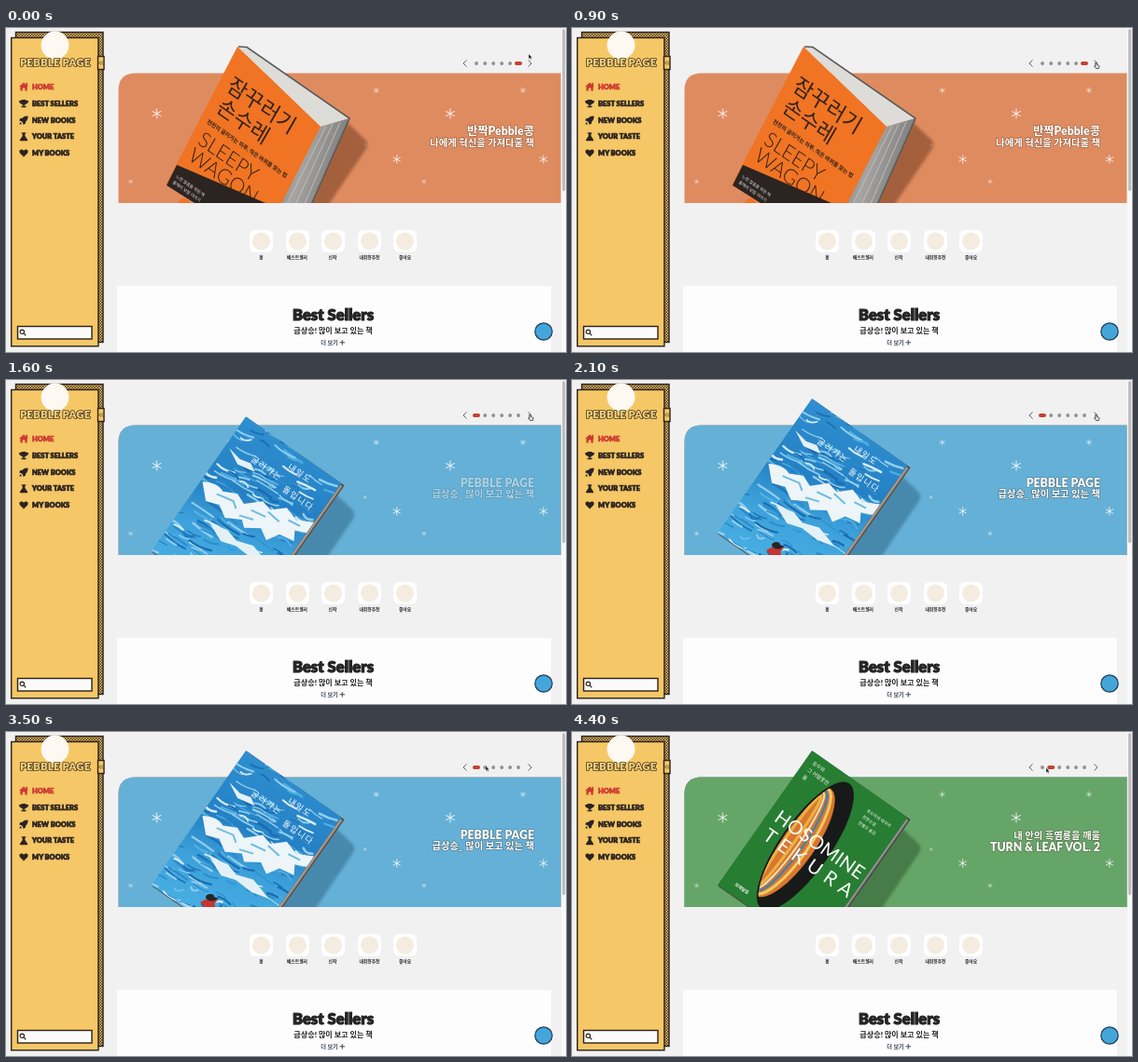
Write an HTML page that moves like this. It is 600 px wide and 348 px high and loops after 4.5 s.

```html
<!DOCTYPE html>
<html lang="ko">
<head>
<meta charset="utf-8">
<title>Book shop</title>
<style>
html, body { margin: 0; width: 100%; height: 100%; overflow: hidden; background: #f1f1f2; }
svg { display: block; width: 100vw; height: 100vh; }
text { font-family: Lato, "Noto Sans CJK KR", "Noto Sans CJK", sans-serif; }
.mid { text-anchor: middle; }
.heavy { font-weight: 900; paint-order: stroke; }
.menu { font-size: 7.4px; letter-spacing: .05px; fill: #2b2320; stroke: #2b2320; stroke-width: .7px; }
.red { fill: #cf3a30; stroke: #cf3a30; }
.caption text { font-size: 10.3px; font-weight: 700; fill: #fff; text-anchor: end;
  paint-order: stroke; stroke: rgba(60, 40, 25, .45); stroke-width: 1.2px; stroke-linejoin: round; }
.caption .big { font-size: 12.3px; font-weight: 900; }
.anim > * { animation: 4.5s linear infinite both; }

/* Banner colours and captions */
.anim > .blue { animation-name: blueIn; }
.anim > .green { animation-name: greenIn; }
.anim > .c1 { animation-name: cap1; }
.anim > .c2 { animation-name: cap2; }
.anim > .c3 { animation-name: cap3; }
@keyframes blueIn { 0%, 22.2% { opacity: 0 } 26%, 100% { opacity: 1 } }
@keyframes greenIn { 0%, 79.4% { opacity: 0 } 83.5%, 100% { opacity: 1 } }
@keyframes cap1 { 0%, 22.2% { opacity: 1 } 25.5%, 100% { opacity: 0 } }
@keyframes cap2 { 0%, 32% { opacity: 0 } 40%, 79.4% { opacity: 1 } 83%, 100% { opacity: 0 } }
@keyframes cap3 { 0%, 88% { opacity: 0 } 96%, 100% { opacity: 1 } }

/* Each book drops out before the next one rises */
.anim > .b1 { animation-name: book1; }
.anim > .b2 { animation-name: book2; }
.anim > .b3 { animation-name: book3; }
@keyframes book1 {
  0%, 22.2% { transform: none; animation-timing-function: ease }
  28.9%, 100% { transform: translateY(170px) }
}
@keyframes book2 {
  0%, 28.9% { transform: translateY(170px); animation-timing-function: ease }
  40% { transform: none }
  79.4% { transform: none; animation-timing-function: ease }
  86.1%, 100% { transform: translateY(170px) }
}
@keyframes book3 {
  0%, 86.1% { transform: translateY(170px); animation-timing-function: ease }
  96%, 100% { transform: none }
}

/* Pager */
.dot { fill: #8f8f90; x: -1.9px; width: 3.8px; }
.anim > .d1 { animation-name: dot1; }
.anim > .d2 { animation-name: dot2; }
.anim > .d6 { animation-name: dot6; }
@keyframes dot1 {
  0%, 22.2% { fill: #8f8f90; x: -1.9px; width: 3.8px }
  28%, 79.4% { fill: #c5412f; x: -4px; width: 8px }
  86%, 100% { fill: #8f8f90; x: -1.9px; width: 3.8px }
}
@keyframes dot2 {
  0%, 79.4% { fill: #8f8f90; x: -1.9px; width: 3.8px }
  86%, 100% { fill: #c5412f; x: -4px; width: 8px }
}
@keyframes dot6 {
  0%, 22.2% { fill: #c5412f; x: -4px; width: 8px }
  31%, 100% { fill: #8f8f90; x: -1.9px; width: 3.8px }
}

/* Pointer */
.cursor { animation: move 4.5s ease-in-out infinite; }
.anim > .hand { animation-name: hand; animation-timing-function: step-end; }
.anim > .arrow { animation-name: arrow; animation-timing-function: step-end; }
@keyframes move {
  0%, 4% { transform: translate(560px, 28px) }
  17.8%, 55.6% { transform: translate(561px, 37px) }
  65%, 87% { transform: translate(514px, 36.5px) }
  95.6%, 100% { transform: translate(508px, 38.5px) }
}
@keyframes hand { 0% { opacity: 0 } 15.5% { opacity: 1 } 57.8%, 100% { opacity: 0 } }
@keyframes arrow { 0% { opacity: 1 } 15.5% { opacity: 0 } 57.8%, 100% { opacity: 1 } }
</style>
</head>
<body>
<svg viewBox="0 0 600 348" preserveAspectRatio="none">
  <defs>
    <pattern id="check" width="3" height="3" patternUnits="userSpaceOnUse">
      <rect width="3" height="3" fill="#f0c368"/>
      <path d="M0 0h1.5v1.5H0zM1.5 1.5H3V3H1.5z" fill="#4a3720"/>
    </pattern>
    <path id="star" d="M0-5V5M-4.4-2.5L4.4 2.5M-4.4 2.5L4.4-2.5" stroke="#fff" stroke-width=".9" stroke-linecap="round"/>
    <pattern id="stars" x="120.5" y="48" width="157.2" height="140" patternUnits="userSpaceOnUse">
      <use href="#star" x="41" y="44"/>
      <use href="#star" transform="translate(119 19) scale(.58)"/>
      <use href="#star" transform="translate(141 93) scale(.85)"/>
      <use href="#star" transform="translate(107 78) scale(.34)"/>
      <use href="#star" transform="translate(13 117) scale(.45)"/>
    </pattern>
    <path id="panel" d="M120.500 188V67Q120.500 48.500 139 48.500H594.500V188Z"/>
    <clipPath id="window"><rect x="100" width="500" height="188"/></clipPath>
    <clipPath id="seaCover"><rect width="125" height="176"/></clipPath>
    <clipPath id="oval"><ellipse cx="53" cy="88" rx="25" ry="80"/></clipPath>
    <filter id="blur" x="-30%" y="-30%" width="160%" height="160%"><feGaussianBlur stdDeviation="1.6"/></filter>
    <linearGradient id="sea" x2=".2" y2="1">
      <stop stop-color="#2f8fd0"/><stop offset=".45" stop-color="#2480c4"/><stop offset=".7" stop-color="#3ca0da"/><stop offset="1" stop-color="#47aee2"/>
    </linearGradient>
    <linearGradient id="pages" x2="1" y2=".35">
      <stop stop-color="#6d6d6d"/><stop offset=".5" stop-color="#a5a4a2"/><stop offset="1" stop-color="#777"/>
    </linearGradient>
    <path id="shade" d="M350 100L370 119Q376 124 371 131L322 204H270Z" filter="url(#blur)"/>
  </defs>

  <rect width="600" height="348" fill="#f1f1f2"/>

  <!-- Sidebar -->
  <g stroke="#2b2118" stroke-width="1.4">
    <rect x="10.5" y="4.5" width="93.5" height="333" fill="url(#check)"/>
    <rect x="5.700" y="10.500" width="93.200" height="331.300" fill="#f5c766"/>
    <rect x="98.500" y="30.500" width="6.500" height="14" fill="#f5c766"/>
    <rect x="12.500" y="320.500" width="79.500" height="13.500" fill="#fafafa"/>
    <g fill="none" stroke-width="1.1"><circle cx="17.3" cy="326.3" r="2.2"/><path d="M19 328l2.3 2.4"/></g>
    <path d="M101.5 35.5l-1.6 2 1.6 2M104 35.5l-1.6 2 1.6 2" fill="none" stroke-width=".7"/>
  </g>
  <circle cx="52.5" cy="18.500" r="15" fill="#fdf8f2"/>
  <text class="mid heavy" x="52.700" y="41.300" font-size="11.400" letter-spacing=".2" fill="#f8d67e" stroke="#4d3a22" stroke-width="1.700" stroke-linejoin="round">PEBBLE PAGE</text>
  <g class="heavy">
    <text class="menu red" x="28" y="65.700">HOME</text>
    <text class="menu" x="28" y="83.600">BEST SELLERS</text>
    <text class="menu" x="28" y="101.500">NEW BOOKS</text>
    <text class="menu" x="28" y="119.400">YOUR TASTE</text>
    <text class="menu" x="28" y="137.200">MY BOOKS</text>
  </g>
  <g fill="#2b2320">
    <path d="M19 58.500L24 63h-1.300v4.500h-2.400v-3h-2.600v3h-2.400V63H14ZM21.500 58.800h1.500v3h-1.500Z" fill="#cf3a30"/>
    <path d="M16.400 77h5.200v1H24q0 3.300-2.900 3.800-.6.8-1.400 1v1h1.800v1.400h-5v-1.400h1.800v-1q-.8-.2-1.400-1Q14 81.300 14 78h2.400Z"/>
    <path d="M23.500 94.500q-4.200-.2-6 2.300l-2.500.5-.8 2.300 2 .3 1.900 1.900.3 2 2.300-.8.5-2.500q2.500-1.800 2.300-6ZM15.200 101l-.8 2.700 2.700-.8Z"/>
    <path d="M16.800 112.300h4.400v1.100h-.8v2.600l2.800 4.200q.3 1-.8 1h-6.800q-1.100 0-.8-1l2.800-4.200v-2.600h-.8Z"/>
    <path d="M19 138.500l-4-4q-1.500-2.300.4-3.700 2-1 3.600 1 1.600-2 3.600-1 1.900 1.400.4 3.700Z"/>
  </g>

  <!-- Banner -->
  <use href="#panel" fill="#df8b60"/>
  <g class="anim">
    <use class="blue" href="#panel" fill="#65b0d6"/>
    <use class="green" href="#panel" fill="#66a568"/>
  </g>
  <use href="#panel" fill="url(#stars)"/>

  <g clip-path="url(#window)"><g class="anim">
    <g class="b1">
      <use href="#shade" x="14" fill="#7d4426" opacity=".6"/>
      <path d="M248 20L258 21 368 97 337 106Z" fill="#dedcd8"/>
      <path d="M337 106L368 97 327 190 284 204Z" fill="url(#pages)"/>
      <path d="M343 105L294 203M350 103L304 203M358 101L315 200" stroke="#c9c7c3" stroke-width=".8"/>
      <path d="M249 20L258 20.5 368 97 326 192" fill="none" stroke="#5a5a5a" stroke-width="1.6"/>
      <path d="M248 20L337 106 284 210 172 167Z" fill="#f07423"/>
      <path d="M183 147L292 194 284 240 172 169Z" fill="#2b2421"/>
      <g transform="translate(248 20) rotate(35) skewX(5)" fill="#33231a">
        <g font-size="23" font-weight="300">
          <text x="12" y="45">잠꾸러기</text>
          <text x="14" y="70">손수레</text>
          <text x="14" y="110" font-size="22">SLEEPY</text>
          <text x="14" y="130" font-size="22">WAGON</text>
        </g>
        <text x="12" y="86" font-size="6" font-weight="700">천천히 굴러가는 하루, 작은 바퀴를 찾는 법</text>
        <g fill="#eee" font-size="4.5">
          <text x="13" y="153">느린 걸음을 위한 책</text>
          <text x="13" y="160">올해의 낮잠 이야기</text>
        </g>
        <circle cx="36" cy="172" r="7" fill="#f07423"/>
      </g>
    </g>

    <g class="b2">
      <use href="#shade" fill="#356f92" opacity=".6"/>
      <g transform="translate(257 20) rotate(35)">
        <rect x="1" width="128" height="177" fill="#5b5149"/>
        <rect x="125" y="2" width="2.500" height="175" fill="#a7968a"/>
        <rect width="125" height="176" fill="url(#sea)"/>
        <g clip-path="url(#seaCover)">
          <g id="paint" fill="none" stroke-linecap="round"></g>
          <path d="M2 84q14-9 24-4l14-7 12 5 15-14 12 3 13-12 16 5 17-9v14l-12 5 6 10-17 3-8 13-12-7-15 10-7-6-16 9-13-8-14 5Z" fill="#edf5f8"/>
          <path d="M22 86l19-4 7 5M62 79l17-3M78 70l16 2M101 65l14-2M55 91l15-5" fill="none" stroke="#6fbbe2" stroke-width="2"/>
          <path d="M34 116l20-5 14 4 18-6 25 7-19 5-21-1-16 5ZM5 38l16 3 12-3 9 5-20 4Z" fill="#e3f1f7"/>
        </g>
        <g fill="#fff" font-size="9" letter-spacing="1.3">
          <text x="68" y="20">내일도</text>
          <text x="31" y="36">굴러가는</text>
          <text x="77" y="43">돌입니다</text>
        </g>
      </g>
      <path d="M208 183q9-6 15-3l4 1-4 3 2 6h-10Z" fill="#c83432"/>
      <path d="M214 178q0-4 5-4 4 0 4 3l5 2-4 2q-7 2-10-3Z" fill="#292425"/>
    </g>

    <g class="b3">
      <use href="#shade" fill="#315e33" opacity=".6"/>
      <g transform="translate(257 20) rotate(35)">
        <rect x="1" width="128" height="177" fill="#474a46"/>
        <rect x="125" y="2" width="2.500" height="175" fill="#8b928a"/>
        <rect width="125" height="176" fill="#277d32"/>
        <ellipse cx="53" cy="88" rx="27" ry="82" fill="#171a18"/>
        <g clip-path="url(#oval)" fill="none">
          <ellipse cx="40" cy="92" rx="24" ry="70" fill="#d9762f"/>
          <ellipse cx="38" cy="92" rx="19" ry="68" stroke="#f1ca62" stroke-width="3"/>
          <ellipse cx="37" cy="92" rx="14" ry="65" stroke="#3f83a8" stroke-width="2.5"/>
          <ellipse cx="36" cy="92" rx="10" ry="62" stroke="#f0e4be" stroke-width="2"/>
          <ellipse cx="36" cy="92" rx="5" ry="58" stroke="#edb143" stroke-width="3"/>
        </g>
        <g fill="#fff">
          <g font-size="5.6">
            <text x="8" y="12">호수와</text>
            <text x="8" y="21">그 어렴풋한</text>
            <text x="8" y="30">돌</text>
          </g>
          <g font-size="4.6">
            <text x="85" y="20">호소미네 테쿠라</text>
            <text x="85" y="28">장편소설</text>
            <text x="85" y="36">한별오 옮김</text>
            <text x="15" y="166" font-weight="700">모래달집</text>
          </g>
          <text x="9" y="85" font-size="20.5">HOSOMINE</text>
          <text x="10" y="108" font-size="20.5" letter-spacing="6.5">TEKURA</text>
        </g>
      </g>
    </g>
  </g></g>

  <g class="anim caption">
    <g class="c1"><text class="big" x="566" y="114.6">반짝Pebble콩</text><text x="566" y="126.7">나에게 혁신을 가져다줄 책</text></g>
    <g class="c2"><text class="big" x="566" y="115">PEBBLE PAGE</text><text x="566" y="126">급상승_ 많이 보고 있는 책</text></g>
    <g class="c3"><text x="566" y="115">내 안의 흑염룡을 깨울</text><text class="big" x="566" y="127.5">TURN &amp; LEAF VOL. 2</text></g>
  </g>

  <!-- Pager -->
  <path d="M493.5 34.5l-3.5 3.5 3.5 3.5M559.5 34.5l3.5 3.5-3.5 3.5" fill="none" stroke="#666"/>
  <g class="anim" transform="translate(504 38)"><rect class="dot d1" y="-1.9" height="3.8" rx="1.9"/></g>
  <g class="anim" transform="translate(513.3 38)"><rect class="dot d2" y="-1.9" height="3.8" rx="1.9"/></g>
  <g fill="#8f8f90"><circle cx="522.2" cy="38" r="1.9"/><circle cx="531.2" cy="38" r="1.9"/><circle cx="540.1" cy="38" r="1.9"/></g>
  <g class="anim" transform="translate(549 38)"><rect class="dot d6" y="-1.9" height="3.8" rx="1.9"/></g>

  <!-- Categories -->
  <g fill="#fff">
    <rect x="261" y="217" width="25" height="24" rx="6"/><rect x="300" y="217" width="25" height="24" rx="6"/>
    <rect x="338" y="217" width="25" height="24" rx="6"/><rect x="377" y="217" width="25" height="24" rx="6"/>
    <rect x="415" y="217" width="25" height="24" rx="6"/>
  </g>
  <g fill="#f4ece1">
    <circle cx="273.5" cy="229" r="9.5"/><circle cx="312.5" cy="229" r="9.5"/><circle cx="350.5" cy="229" r="9.5"/>
    <circle cx="389.5" cy="229" r="9.5"/><circle cx="427.5" cy="229" r="9.5"/>
  </g>
  <g class="mid" font-size="4.8" font-weight="900" fill="#222">
    <text x="273.5" y="248">홈</text><text x="312" y="248">베스트셀러</text><text x="350" y="248">신작</text>
    <text x="389.5" y="248">내취향추천</text><text x="427.5" y="248">좋아요</text>
  </g>

  <!-- Best sellers -->
  <rect x="119" y="277" width="465" height="71" fill="#fdfdfd"/>
  <g class="mid" fill="#242424">
    <text class="heavy" x="350.5" y="313.5" font-size="16.4" letter-spacing=".1" stroke="#242424" stroke-width="1.1">Best Sellers</text>
    <text x="350.5" y="328" font-size="8.1" font-weight="900">급상승! 많이 보고 있는 책</text>
    <text x="346.5" y="340.2" font-size="6.2" font-weight="700" fill="#3b465c">더 보기</text>
  </g>
  <path d="M357.5 337.8h5.5M360.25 335v5.600" stroke="#3b465c"/>

  <circle cx="576" cy="326" r="9.2" fill="#45a5da" stroke="#1f3b52" stroke-width="1.2"/>

  <!-- Scrollbar -->
  <rect x="595" width="5" height="348" fill="#f8f8f8"/>
  <rect x="596" y="1" width="3.2" height="174" rx="1.6" fill="#bdbdbe"/>

  <g class="cursor"><g class="anim">
    <path class="arrow" d="M0 0V5.200L1.300 4.100 2.200 6 3.100 5.600 2.200 3.700H3.800Z" fill="#111" stroke="#fff" stroke-width=".3"/>
    <path class="hand" d="M.2 0Q1.200-.2 1.300.8V2.600L3.500 3.100Q4.200 3.400 4 4.500L3.300 6.500H.5L-1.200 4Q-1.200 3.200-.4 3.500V.6Q-.4.100.2 0Z" fill="#ddd" stroke="#222" stroke-width=".7"/>
  </g></g>
</svg>
<script>
// Seeded brush strokes for the painted sea cover
let seed = 11;
const rand = () => (seed = seed * 16807 % 2147483647) / 2147483647;
const tones = ['#1a6db2', '#2b8acb', '#4fb0e2', '#8fcdec', '#d8edf6'];
let strokes = '';
for (let i = 0; i < 190; i++) {
  const x = rand() * 125 - 8, y = rand() * 176, length = 8 + rand() * 20;
  const tone = tones[Math.floor(rand() * tones.length)];
  strokes += `<path d="M${x} ${y}q${length / 2} ${rand() * 8 - 4} ${length} ${rand() * 6 - 5}"`
    + ` stroke="${tone}" stroke-width="${.7 + rand() * 2}"/>`;
}
document.getElementById('paint').innerHTML = strokes;
</script>
</body>
</html>
```
